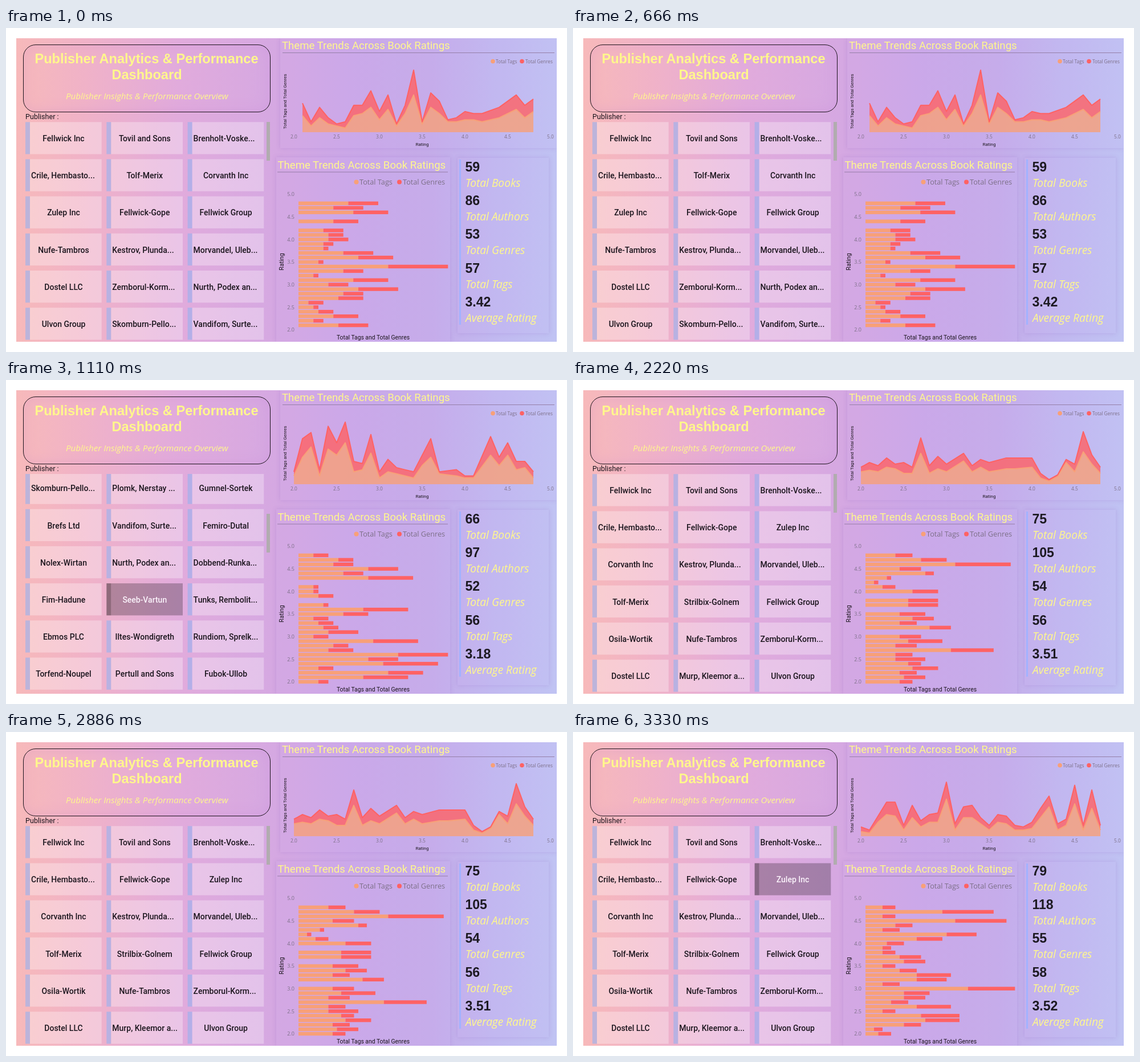
Animation, 984 px wide and 569 px high, one loop 4.44 s. Source, as an HTML page:

```html
<!DOCTYPE html>
<html lang="en">
<head>
<meta charset="utf-8">
<title>Publisher dashboard</title>
<style>
html, body { margin: 0; width: 100%; height: 100%; overflow: hidden; background: #fff; }
.board {
  position: absolute; left: 18px; top: 18px; width: 948px; height: 533px; overflow: hidden;
  background: linear-gradient(90deg, #f7b9ba 0, #f0b2c8 13%, #e1abdc 30%, #d5a8e2 48%,
    #cba8e8 62%, #c5ace9 76%, #c1b8f0 88%, #c0c3f3 100%);
}
.panel { position: absolute; box-shadow: 0 0 7px rgba(140, 95, 190, .26); background: rgba(200, 160, 235, .08); }
.head { box-sizing: border-box; border: 1px solid #1c141c; border-radius: 22px; background: none;
  box-shadow: inset 0 0 24px rgba(195, 120, 215, .2); }
svg { position: absolute; left: 0; top: 0; }
text { white-space: pre; }
.din { font-family: Roboto, "Open Sans", sans-serif; fill: #1b151d; }
.ui { font-family: "Open Sans", "Noto Sans", sans-serif; fill: #7d7088; }
.bold { font-family: "Liberation Sans", Arial, sans-serif; font-weight: 700; fill: #1d1a22; }
.it { font-style: italic; }
.title { fill: #fff78c; }
.name { font-size: 14px; font-weight: 500; }
.mid { text-anchor: middle; }
.end { text-anchor: end; }
.tags { fill: #f8a078; }
.genres { fill: #ff6264; }
.area { fill-opacity: .8; }
.line { fill: none; stroke-width: 2; stroke-linejoin: round; }
.scene { visibility: hidden; animation: show 4440ms step-end infinite; }
@keyframes show { 0% { visibility: visible; } 25%, 100% { visibility: hidden; } }
</style>
</head>
<body>
<div class="board">
  <div class="panel head" style="left:12px;top:11px;width:434px;height:119px"></div>
  <div class="panel" style="left:463px;top:0;width:485px;height:193px"></div>
  <div class="panel" style="left:456px;top:209px;width:305px;height:324px"></div>
  <div class="panel" style="left:774px;top:210px;width:160px;height:308px"></div>
</div>
<svg id="stage" width="984" height="569" viewBox="0 0 984 569">
  <clipPath id="list"><rect x="30" y="165" width="425" height="383"/></clipPath>
</svg>
<script>
const NS = 'http://www.w3.org/2000/svg';
const stage = document.getElementById('stage');

function add(parent, tag, attrs, text) {
  const el = document.createElementNS(NS, tag);
  for (const key in attrs) el.setAttribute(key, attrs[key]);
  if (text !== undefined) el.textContent = text;
  parent.appendChild(el);
  return el;
}
const rect = (g, x, y, width, height, attrs) => add(g, 'rect', { x, y, width, height, ...attrs });
function label(g, str, x, y, cls, size, turn) {
  const attrs = { x, y, class: cls };
  if (size) attrs['font-size'] = size;
  if (turn) attrs.transform = `rotate(-90 ${x} ${y})`;
  add(g, 'text', attrs, str);
}
const rule = (x1, x2, y) => rect(stage, x1, y, x2 - x1, 1, { fill: '#957fa8' });

function legend(items, y, r, size, drop) {
  items.forEach(([str, cls, dot, x]) => {
    add(stage, 'circle', { cx: dot, cy: y, r, class: cls });
    label(stage, str, x, y + drop, 'ui', size);
  });
}

function drawFixed() {
  label(stage, 'Publisher Analytics & Performance', 246.5, 62.3, 'bold title mid', 23.57);
  label(stage, 'Dashboard', 247, 90, 'bold title mid', 23.57);
  label(stage, 'Publisher Insights & Performance Overview', 247.3, 125, 'ui it title mid', 15.1);
  label(stage, 'Publisher :', 34, 159.5, 'din', 12.6);

  label(stage, 'Theme Trends Across Book Ratings', 484, 36.5, 'din title', 18.6);
  rule(485, 962, 43);
  legend([['Total Tags', 'tags', 854, 859], ['Total Genres', 'genres', 905, 911]], 58.5, 3.8, 8.2, 3);
  label(stage, 'Total Tags and Total Genres', 491.5, 129, 'din mid', 7.8, true);
  label(stage, 'Rating', 730, 207, 'din mid', 8.1);

  label(stage, 'Theme Trends Across Book Ratings', 476.5, 246.5, 'din title', 18.6);
  rule(476, 775, 252.5);
  legend([['Total Tags', 'tags', 614.5, 620], ['Total Genres', 'genres', 690, 696]], 270.5, 4, 12.7, 4.5);
  label(stage, 'Total Tags and Total Genres', 644, 547, 'din mid', 10.35);
  label(stage, 'Rating', 486.5, 410.5, 'din mid', 10.7, true);

  for (let r = 2; r <= 5; r += 0.5) {
    label(stage, r.toFixed(1), ratingX(r), 194.3, 'ui mid', 8.4);
    label(stage, r.toFixed(1), 506, ratingY(r) + 3.2, 'ui end', 9);
  }
  rect(stage, 795, 231, 3, 290, { fill: '#a2b2ff' });
  ['Total Books', 'Total Authors', 'Total Genres', 'Total Tags', 'Average Rating']
    .forEach((str, i) => label(stage, str, 806, 279 + i * 59.2, 'ui it title', 19.2));
}

const ratingX = r => 505 + (r - 2) * 150;
const ratingY = r => 530 - (r - 2) * 79.33;

function drawNames(g, { names, picked, shift }) {
  const box = add(g, 'g', { 'clip-path': 'url(#list)' });
  names.split('|').forEach((name, i) => {
    const x = 34 + (i % 3) * 142.3;
    const y = 165.2 - shift + Math.floor(i / 3) * 65.2;
    const on = i === picked;
    rect(box, x, y, 8, 56.3, { fill: on ? 'rgba(0,0,0,.4)' : 'rgba(150,178,240,.6)' });
    rect(box, x + 8, y, 125.7, 56.3, { fill: on ? 'rgba(40,30,40,.3)' : 'rgba(255,255,255,.3)' });
    const cut = name.endsWith('...');
    const el = cut ? [x + 10, 'din name'] : [x + 67, 'din name mid'];
    label(box, name, el[0], y + 33.8, el[1]);
    if (on) box.lastChild.style.fill = '#fbf3fb';
  });
  rect(g, 457, shift ? 235 : 165, 6, 68, { fill: '#b1acaf' });
}

// Both charts share the data: one value per 0.1 rating, from 2.0 to 4.8.
function drawCharts(g, { tags, genres, top, high }) {
  const pts = tags.map((t, i) => ({ r: 2 + i / 10, t, sum: t + genres[i] })).filter(p => p.sum);
  const unitX = 262.3 / top, unitY = 109 / high;
  const path = key => pts.map(p => `${ratingX(p.r).toFixed(1)},${(183 - p[key] * unitY).toFixed(1)}`);
  const low = path('t'), upper = path('sum');
  const x0 = ratingX(pts[0].r), x1 = ratingX(pts[pts.length - 1].r);

  add(g, 'polygon', { points: [...low, `${x1},183`, `${x0},183`].join(' '), class: 'tags area' });
  add(g, 'polygon', { points: [...upper, ...low.slice().reverse()].join(' '), class: 'genres area' });
  add(g, 'polyline', { points: low.join(' '), class: 'line', stroke: '#f8a078' });
  add(g, 'polyline', { points: upper.join(' '), class: 'line', stroke: '#ff6264' });

  pts.forEach(p => {
    const y = ratingY(p.r) - 3.2;
    rect(g, 513, y, p.t * unitX, 6.4, { class: 'tags' });
    rect(g, 513 + p.t * unitX, y, (p.sum - p.t) * unitX, 6.4, { class: 'genres' });
  });
}

const firstPage = 'Fellwick Inc|Tovil and Sons|Brenholt-Voske...|Crile, Hembasto...|';
const mixedPage = firstPage + 'Fellwick-Gope|Zulep Inc|Corvanth Inc|Kestrov, Plunda...|Morvandel, Uleb...|' +
  'Tolf-Merix|Strilbix-Golnem|Fellwick Group|Osila-Wortik|Nufe-Tambros|Zemborul-Korm...|' +
  'Dostel LLC|Murp, Kleemor a...|Ulvon Group';

const scenes = [
  {
    names: firstPage + 'Tolf-Merix|Corvanth Inc|Zulep Inc|Fellwick-Gope|Fellwick Group|' +
      'Nufe-Tambros|Kestrov, Plunda...|Morvandel, Uleb...|Dostel LLC|Zemborul-Korm...|Nurth, Podex an...|' +
      'Ulvon Group|Skomburn-Pello...|Vandifom, Surte...',
    picked: -1, shift: 0, top: 30, high: 30,
    tags: [0, 8, 3, 7, 4, 3, 2, 8, 9, 12, 6, 11, 3, 9, 18, 4, 12, 9, 5, 5, 6, 6, 5, 0, 7, 0, 11, 7, 10],
    genres: [0, 6, 2, 5, 3, 1, 3, 5, 4, 8, 4, 7, 1, 4, 12, 1, 7, 6, 1, 2, 4, 3, 4, 0, 5, 0, 7, 6, 6],
    cards: ['59', '86', '53', '57', '3.42']
  },
  {
    names: 'Skomburn-Pello...|Plomk, Nerstay ...|Gumnel-Sortek|Brefs Ltd|Vandifom, Surte...|Femiro-Dutal|' +
      'Nolex-Wirtan|Nurth, Podex an...|Dobbend-Runka...|Fim-Hadune|Seeb-Vartun|Tunks, Rembolit...|' +
      'Ebmos PLC|Iltes-Wondigreth|Rundiom, Sprelk...|Torfend-Noupel|Pertull and Sons|Fubok-Ullob',
    picked: 10, shift: 3.7, top: 30, high: 30,
    tags: [4, 13, 18, 4, 17, 14, 20, 6, 7, 15, 3, 6, 5, 4, 3, 9, 13, 5, 0, 4, 3, 3, 0, 14, 9, 14, 7, 8, 3],
    genres: [2, 9, 7, 3, 11, 6, 10, 5, 3, 9, 3, 6, 3, 3, 3, 5, 9, 1, 0, 3, 1, 1, 0, 9, 4, 6, 4, 3, 3],
    cards: ['66', '97', '52', '56', '3.18']
  },
  {
    names: mixedPage,
    picked: -1, shift: 0, top: 35, high: 40.2,
    tags: [8, 9, 8, 11, 10, 7, 7, 20, 7, 10, 8, 0, 15, 8, 11, 8, 0, 10, 10, 0, 11, 4, 2, 5, 14, 8, 21, 13, 7],
    genres: [3, 5, 4, 6, 3, 7, 4, 10, 5, 8, 5, 0, 5, 4, 5, 6, 0, 7, 7, 0, 6, 3, 1, 1, 2, 5, 13, 6, 4],
    cards: ['75', '105', '54', '56', '3.51']
  },
  {
    names: mixedPage,
    picked: 5, shift: 0, top: 35, high: 40.2,
    tags: [3, 2, 9, 14, 13, 4, 12, 6, 9, 9, 24, 4, 12, 12, 8, 4, 9, 8, 4, 4, 5, 12, 19, 4, 7, 21, 4, 18, 4],
    genres: [3, 2, 4, 8, 9, 3, 8, 4, 5, 6, 11, 4, 7, 8, 4, 3, 5, 5, 3, 2, 4, 6, 7, 4, 4, 12, 3, 12, 3],
    cards: ['79', '118', '55', '58', '3.52']
  }
];

drawFixed();
scenes.forEach((scene, i) => {
  const g = add(stage, 'g', { class: 'scene', style: `animation-delay:${i * 1110 - 4440}ms` });
  drawNames(g, scene);
  drawCharts(g, scene);
  scene.cards.forEach((str, k) => label(g, str, 805.5, 252 + k * 59.2, 'bold', 23));
});
</script>
</body>
</html>
```
